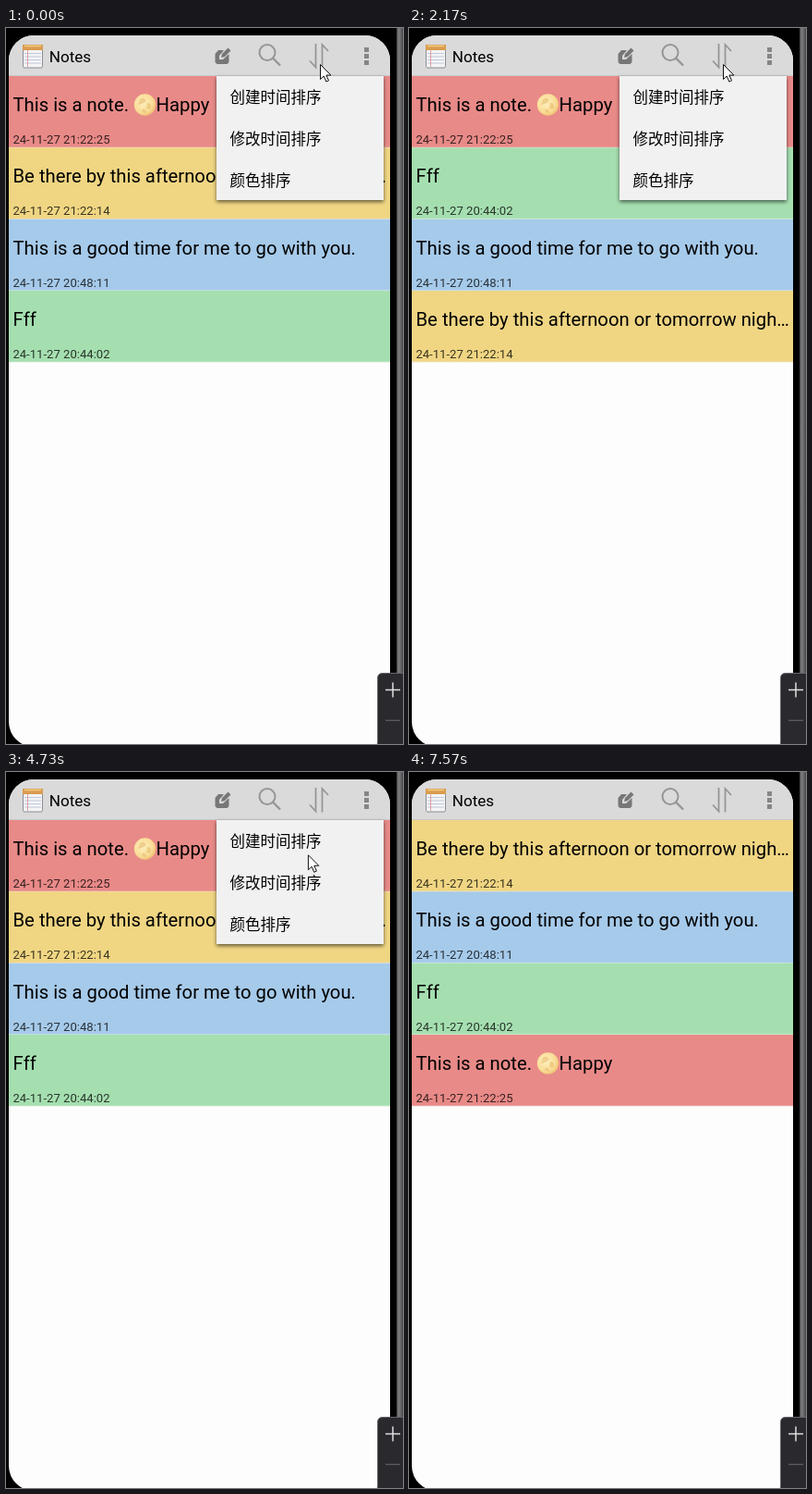
Recreate the animation shown at these times as an HTML page. Size 430 px wide and 774 px high, loop 7610 ms.

```html
<!DOCTYPE html>
<html lang="zh-CN">
<head>
<meta charset="utf-8">
<title>Notes sorting</title>
<style>
  html, body { margin: 0; width: 100%; height: 100%; overflow: hidden; background: #000; }
  svg { display: block; width: 430px; height: 774px; }
  text { font-family: Roboto, sans-serif; white-space: pre; }
  .title { font-size: 20.25px; }
  .date { font-size: 13.1px; fill-opacity: .76; }
  .menu text { font: 16.5px "Noto Sans CJK SC", "Noto Sans CJK", sans-serif; }
</style>
</head>
<body>
<svg viewBox="0 0 430 774">
  <defs>
    <clipPath id="screen"><rect x="3" y="8" width="413" height="769" rx="27"/></clipPath>
    <linearGradient id="edge">
      <stop offset="0" stop-color="#3c3c3e"/>
      <stop offset=".3" stop-color="#808082"/>
      <stop offset=".6" stop-color="#6c6c6e"/>
      <stop offset="1" stop-color="#444446"/>
    </linearGradient>
    <radialGradient id="moon" cx=".4" cy=".4" r=".65">
      <stop offset="0" stop-color="#fff0c0"/>
      <stop offset=".7" stop-color="#f9dc95"/>
      <stop offset="1" stop-color="#efbf70"/>
    </radialGradient>
    <filter id="shadow" x="-10%" y="-10%" width="120%" height="125%">
      <feDropShadow dx="0" dy="2" stdDeviation="2" flood-color="#000" flood-opacity=".6"/>
    </filter>
  </defs>

  <rect width="430" height="774"/>
  <rect x="423" width="7" height="774" fill="url(#edge)"/>

  <g clip-path="url(#screen)">
    <rect x="3" y="8" width="413" height="769" fill="#fdfdfd"/>
    <g id="rows"></g>
    <rect x="3" y="8" width="413" height="44" fill="#dadada"/>
    <rect x="3" y="51" width="413" height="1" fill="#c8c8c8"/>

    <!-- app icon -->
    <rect x="18.5" y="18.5" width="21" height="24.5" rx="1.5" fill="#f4f4f6" stroke="#8b8b96"/>
    <path d="M18 18h22v6H18z" fill="#d99c50"/>
    <path d="M20 19.5h18" stroke="#f0cc80" stroke-width="1.5"/>
    <path d="M20 27.5h18M20 31h18M20 34.5h18M20 38h18" stroke="#b9c2d4" stroke-width=".9"/>
    <path d="M23.5 24v18" stroke="#dc8c8c" stroke-width=".8"/>
    <text x="46.7" y="37" font-size="17.1">Notes</text>

    <!-- toolbar icons -->
    <path d="M230 24h6l-5 6v4h4l6.500-6v9l-2 2h-11l-2-2v-9z" fill="#777"/>
    <path d="M233 32l1-4 6.500-6.500 3 3-6.500 6.500z" fill="#777"/>
    <g fill="none" stroke="#969696" stroke-width="2">
      <circle cx="283" cy="26.5" r="8.5"/>
      <path d="M289 32.5l8 8" stroke-width="2.4"/>
      <path d="M335.5 17v25.5l-6.5-7M342.5 43.5V18l6.5 7" stroke-width="1.8"/>
    </g>
    <path d="M388 21h5v5h-5zM388 28h5v5h-5zM388 35h5v5h-5z" fill="#868686"/>
  </g>

  <g id="menu" class="menu">
    <rect x="228" y="52" width="181" height="134" fill="#f1f1f1" filter="url(#shadow)"/>
    <text x="242.5" y="81">创建时间排序</text>
    <text x="242.5" y="125.5">修改时间排序</text>
    <text x="242.5" y="170.5">颜色排序</text>
  </g>

  <path d="M402.500 775v-72q0-5.500 5.500-5.500h24v78z" fill="#2a2a2e" stroke="#66666a"/>
  <path d="M411 715.5h16M419 707.5v16" stroke="#dedee0" stroke-width="1.5"/>
  <path d="M411 748.5h16" stroke="#5c5c60" stroke-width="1.3"/>

  <path id="cursor" d="M.5.5v16l3.700-3.500 2.600 6 2.700-1.200-2.600-5.800h5z" fill="#fff" stroke="#111"/>
</svg>

<script>
const LOOP = 7610, ROW = 77.3, FADE = 110;

const notes = [
  ["This is a note. ", "24-11-27 21:22:25", "#e88a88"],
  ["Be there by this afternoon or tomorrow nigh…", "24-11-27 21:22:14", "#f0d683"],
  ["This is a good time for me to go with you.", "24-11-27 20:48:11", "#a6caea"],
  ["Fff", "24-11-27 20:44:02", "#a5dfb0"]
];

// start time, then notes from top to bottom
const sorts = [
  [0, [0, 1, 2, 3]],
  [960, [0, 3, 2, 1]],
  [3260, [0, 1, 2, 3]],
  [5320, [1, 2, 3, 0]]
];

// menu open and close times
const openings = [[-FADE, 960], [2050, 3260], [4180, 5320]];

// pointer: time, x, y
const path = [
  [0, 340, 39], [300, 340, 39], [750, 325, 66], [1450, 325, 66],
  [1850, 340, 39], [2250, 340, 39], [2700, 335, 118], [3600, 335, 118],
  [3980, 340, 39], [4350, 340, 39], [5200, 309, 158], [5450, 309, 158],
  [5980, 262, 89], [6400, 262, 89], [6850, 250, -24], [LOOP, 250, -24]
];

const $ = id => document.getElementById(id);
const clamp = v => Math.max(0, Math.min(1, v));
const ease = u => u * u * (3 - 2 * u);

const moon = `<circle cx="150.5" cy="31" r="11.7" fill="url(#moon)"/>
  <path d="M145 25q4-3 6 0t-4 5-4 1zM153 29q4 0 4 4t-5 2zM147 36q4-1 5 2t-4 1z"
    fill="#e6bd72" opacity=".6"/>
  <text class="title" x="162.6" y="38">Happy</text>`;

$("rows").innerHTML = notes.map(([title, date, color], i) => `<g>
  <rect x="3" width="413" height="${ROW}" fill="${color}"/>
  <rect x="3" y="76.6" width="413" height=".8" fill="#eee" opacity=".5"/>
  <text class="title" x="7.5" y="38">${title}</text>
  <text class="date" x="7.4" y="73.2">${date}</text>${i ? "" : moon}</g>`).join("");
const rows = [...$("rows").children];

function pointerAt(t) {
  const k = path.findIndex(p => p[0] > t);
  const [t0, x0, y0] = path[k - 1], [t1, x1, y1] = path[k];
  const u = ease((t - t0) / (t1 - t0));
  return [x0 + (x1 - x0) * u, y0 + (y1 - y0) * u];
}

function draw(t) {
  const order = sorts.filter(s => s[0] <= t).pop()[1];
  order.forEach((note, i) =>
    rows[note].setAttribute("transform", `translate(0 ${52 + i * ROW})`));
  const alpha = openings.map(([a, b]) =>
    Math.min(clamp((t - a) / FADE), clamp(1 - (t - b) / FADE)));
  $("menu").setAttribute("opacity", Math.max(...alpha));
  $("cursor").setAttribute("transform", `translate(${pointerAt(t)})`);
}

const start = performance.now();
function tick() {
  draw((performance.now() - start) % LOOP);
  requestAnimationFrame(tick);
}
tick();
</script>
</body>
</html>
```
